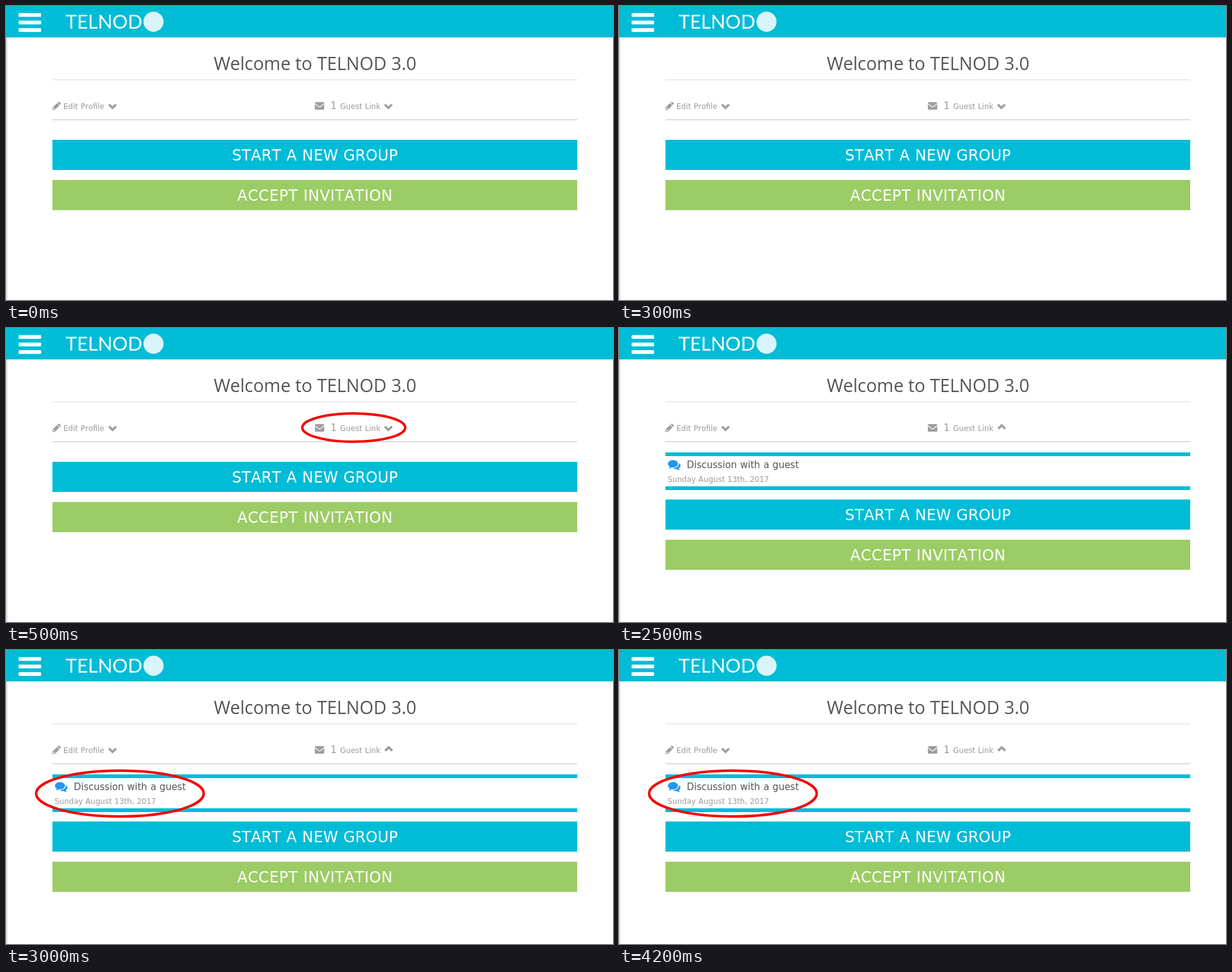
An HTML page for the animation above (5 s loop, 967 by 468 pixels).

```html
<!DOCTYPE html>
<html lang="en">
<head>
<meta charset="utf-8">
<title>Guest link</title>
<style>
  html, body { margin: 0; width: 100%; height: 100%; overflow: hidden; background: #fff; }
  svg { display: block; width: 967px; height: 468px; }
  text { font-family: "DejaVu Sans", Verdana, sans-serif; font-kerning: none; word-spacing: .034em; }
  .title { font: 28.5px "Open Sans", "Noto Sans", sans-serif; word-spacing: 0; fill: #555; }
  .brand { font: 30.5px Lato, sans-serif; fill: #fff; }
  .small { font-size: 12px; fill: #999; }
  .medium { font-size: 15px; }
  .button { font-size: 24px; fill: #fff; text-anchor: middle; }
  .cyan { fill: #00bcd7; }
  .grey { fill: #9e9e9e; }
  .chevron { fill: none; stroke: #9e9e9e; stroke-width: 3.6; }
  .ring { fill: none; stroke: #f60000; stroke-width: 4; }
</style>
</head>
<body>
<svg viewBox="0 0 967 468">
  <defs>
    <linearGradient id="edge">
      <stop offset="0" stop-color="#d4d4d4"/>
      <stop offset="1" stop-color="#fff"/>
    </linearGradient>
    <path id="down" class="chevron" d="M-5.7 -2.8L0 2.7L5.7 -2.8"/>
  </defs>

  <rect y="50" width="4" height="418" fill="url(#edge)"/>
  <rect class="cyan" width="967" height="50"/>
  <g fill="#fff">
    <rect x="20" y="11.3" width="36" height="6" rx="1.5"/>
    <rect x="20" y="23.3" width="36" height="6" rx="1.5"/>
    <rect x="20" y="35.3" width="36" height="6" rx="1.5"/>
  </g>
  <text class="brand" x="95" y="36">TELNOD</text>
  <circle cx="235" cy="25" r="16" fill="#d9f5f9"/>

  <text class="title" x="492.5" y="102" text-anchor="middle">Welcome to TELNOD 3.0</text>
  <rect x="74" y="117" width="836" height="1" fill="#ddd"/>
  <rect x="74" y="180" width="836" height="2" fill="#ddd"/>

  <!-- Edit profile -->
  <g class="grey">
    <path d="M74 165.5v-3.7l7.3 -7.3l3.7 3.7l-7.3 7.3zM82.1 153.7l1.2 -1.2q.8 -.7 1.6 0l2.1 2.1q.7 .8 0 1.6l-1.2 1.2z"/>
    <path d="M75.2 162.5v1.8h1.8l.8 -.8l-1.8 -1.8z" fill="#fff"/>
  </g>
  <text class="small" x="91.5" y="164">Edit Profile</text>
  <use href="#down" x="169.7" y="159.6"/>

  <!-- Guest link -->
  <rect class="grey" x="492" y="153" width="15" height="12" rx="1.5"/>
  <path d="M491.8 155.3L498.2 160.2q1.3 .9 2.6 0L507.2 155.3" fill="none" stroke="#fff" stroke-width="1.1"/>
  <text class="medium" x="517.3" y="164" fill="#999">1</text>
  <text class="small" x="532.3" y="164">Guest Link</text>
  <use id="closedMark" href="#down" x="609.2" y="159.6"/>
  <use id="openMark" href="#down" transform="translate(609.7 157.6) scale(1 -1)"/>

  <g id="panel">
    <rect class="cyan" x="74" y="198" width="836" height="6"/>
    <rect class="cyan" x="74" y="252" width="836" height="6"/>
    <g fill="#2196f3">
      <path d="M98 218.6c0 2.2 -1.2 3.7 -3 4.9q.7 1.5 2.4 2.7q-3 .2 -5.4 -1.7q-3.600 .6 -6.500 -1.200c6 -.2 10.300 -3.300 10.300 -8.200q2.200 1.500 2.200 3.500z"/>
      <path d="M86 210.200c4.500 0 8 2.600 8 5.900s-3.500 5.900 -8 5.900q-1 0 -2 -.2q-2.400 1.900 -5 2q1.500 -1.300 2 -2.900c-1.900 -1.100 -3 -2.800 -3 -4.800c0 -3.300 3.500 -5.900 8 -5.900z"/>
    </g>
    <text class="medium" x="108" y="223" fill="#555">Discussion with a guest</text>
    <text class="small" x="77.500" y="245">Sunday August 13th, 2017</text>
  </g>

  <g id="buttons">
    <rect class="cyan" x="74" y="213" width="836" height="48"/>
    <text class="button" x="492.200" y="246" letter-spacing=".1">START A NEW GROUP</text>
    <rect x="74" y="277" width="836" height="48" fill="#9ccc65"/>
    <text class="button" x="492.200" y="310" letter-spacing=".4">ACCEPT INVITATION</text>
  </g>

  <ellipse id="linkRing" class="ring" cx="554" cy="158.500" rx="82" ry="22.500"/>
  <ellipse id="panelRing" class="ring" cx="181.500" cy="228.500" rx="133.500" ry="36.500"/>
</svg>
<script>
  const LOOP = 5000, OPEN_AT = 2500, RING_DELAY = 500, PANEL_SHIFT = 60;
  const el = id => document.getElementById(id);
  const show = (id, on) => el(id).setAttribute("visibility", on ? "visible" : "hidden");

  function draw(ms) {
    const t = ms % LOOP;
    const open = t >= OPEN_AT;
    const ringed = t % OPEN_AT >= RING_DELAY;
    show("closedMark", !open);
    show("openMark", open);
    show("panel", open);
    show("linkRing", !open && ringed);
    show("panelRing", open && ringed);
    el("buttons").setAttribute("transform", `translate(0 ${open ? PANEL_SHIFT : 0})`);
  }

  const start = performance.now();
  function tick() {
    draw(performance.now() - start);
    requestAnimationFrame(tick);
  }
  tick();
</script>
</body>
</html>
```
